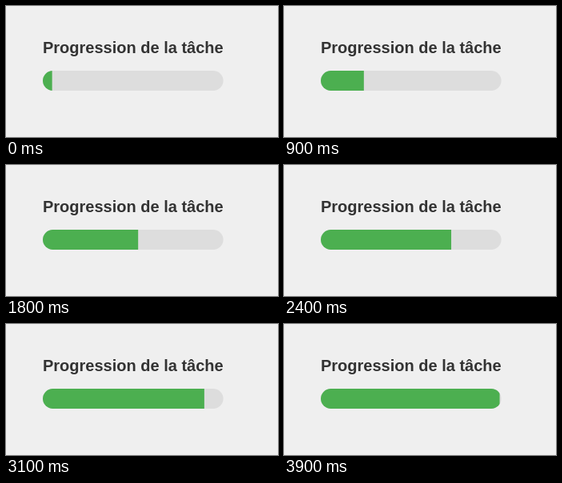
These frames come from a looping animation (340 px wide and 164 px high, 4000 ms). An HTML page with a canvas:

```html
<!DOCTYPE html>
<html lang="fr">
<head>
<meta charset="utf-8">
<title>Progression de la tâche</title>
<style>
  html, body { margin: 0; width: 100%; height: 100%; overflow: hidden; background: #efefef; }
  canvas { display: block; }
  h1 {
    position: absolute; left: 46px; top: 41px; margin: 0;
    font: bold 20px/23px "Liberation Sans", Arial, sans-serif;
    color: #333; white-space: nowrap;
  }
</style>
</head>
<body>
<h1>Progression de la tâche</h1>
<canvas id="stage" width="340" height="164"></canvas>
<script>
const ctx = document.getElementById("stage").getContext("2d");
const LOOP = 4000, STEP = 100;
const bar = { x: 46, y: 81, w: 225.6, h: 25 };

// cubic-bezier(.42, 0, .58, 1), solved by bisection
function easeInOut(x) {
  let lo = 0, hi = 1;
  for (let i = 0; i < 24; i++) {
    const s = (lo + hi) / 2;
    if (((0.52 * s - 0.78) * s + 1.26) * s < x) lo = s;
    else hi = s;
  }
  return lo * lo * (3 - 2 * lo);
}

// The loop shows the later part of a five-second ease
function progress(ms) {
  return easeInOut((800 + 0.99 * ms) / 5000);
}

function draw(ms) {
  const { x, y, w, h } = bar;
  ctx.clearRect(0, 0, 340, 164);
  ctx.save();
  ctx.beginPath();
  ctx.roundRect(x, y, w, h, h / 2);
  ctx.fillStyle = "#ddd";
  ctx.fill();
  ctx.clip();
  ctx.fillStyle = "#4caf50";
  ctx.fillRect(x, y, w * progress(ms), h);
  ctx.restore();
}

const start = performance.now();
function tick() {
  const ms = (performance.now() - start) % LOOP;
  draw(Math.floor(ms / STEP) * STEP);
  requestAnimationFrame(tick);
}
tick();
</script>
</body>
</html>
```
